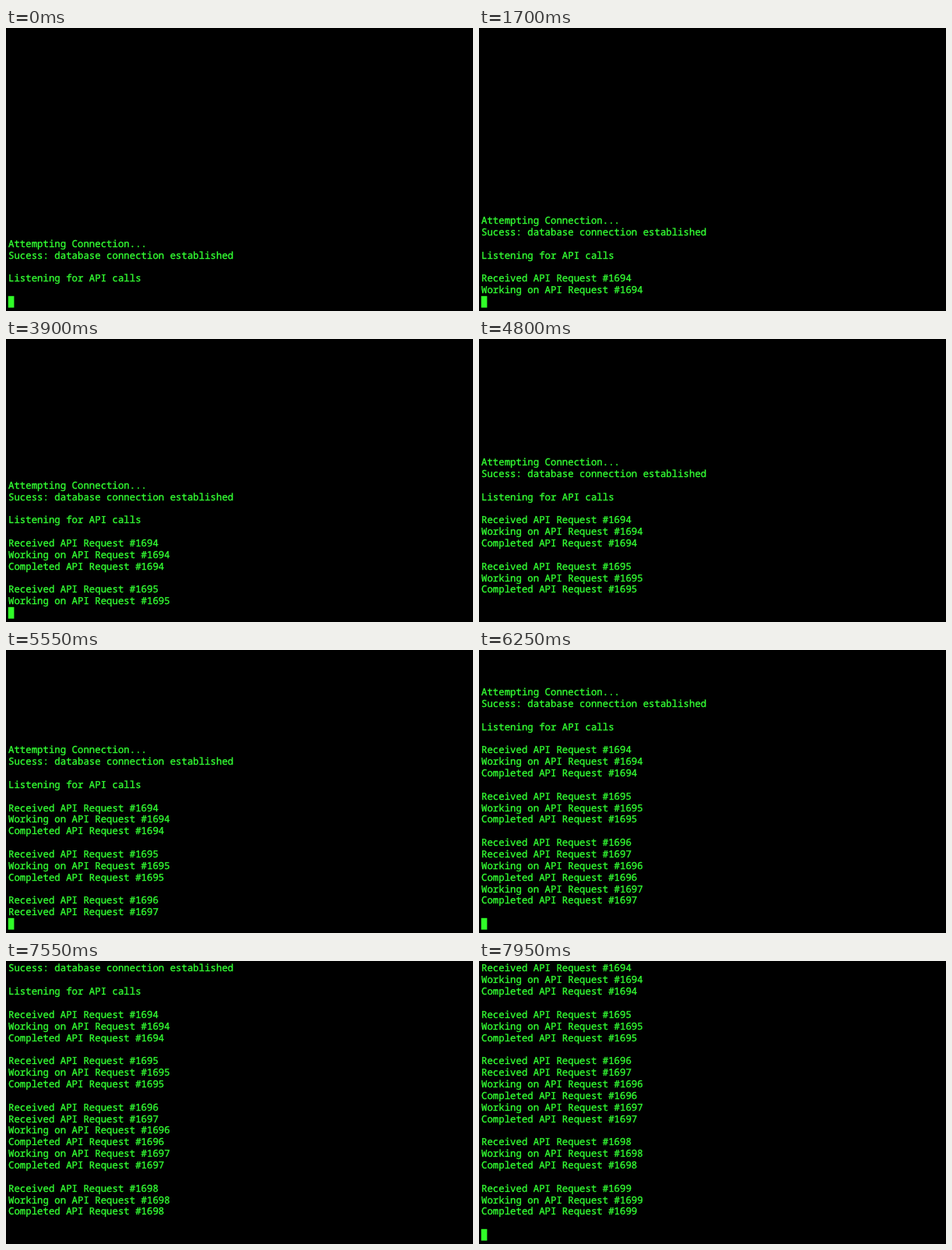
Write an HTML page that moves like this. It is 600 px wide and 363 px high and loops after 8000 ms.

```html
<!DOCTYPE html>
<html lang="en">
<head>
<meta charset="utf-8">
<title>Terminal log</title>
<style>
  html, body { margin: 0; width: 100%; height: 100%; overflow: hidden; background: #000; }
  svg { display: block; width: 600px; height: 363px; background: #000; }
  text {
    font: 12.37px "Noto Sans Mono", "DejaVu Sans Mono", monospace;
    fill: #33ff33;
    stroke: #33ff33;
    stroke-width: 0.35px;
    white-space: pre;
    text-rendering: geometricPrecision;
  }
  #cursor { fill: #30fe28; }
</style>
</head>
<body>
<svg viewBox="0 0 600 363">
  <g id="log"></g>
  <rect id="cursor" x="2.8" y="343.8" width="7.6" height="14.86"/>
</svg>
<script>
const LOOP = 8000;
const PITCH = 14.857;
const CURSOR_TOP = 343.8;
const BASELINE = 11.4;

const received = id => `Received API Request #${id}`;
const working = id => `Working on API Request #${id}`;
const completed = id => `Completed API Request #${id}`;

// Each entry: print time in ms, then the lines printed.
const prints = [
  [0, 'Attempting Connection...', 'Sucess: database connection established', '',
      'Listening for API calls', ''],
  [1600, received(1694), working(1694)],
  [1850, completed(1694), ''],
  [3900, received(1695), working(1695)],
  [4000, completed(1695), ''],
  [5550, received(1696), received(1697)],
  [5700, working(1696)],
  [5850, completed(1696)],
  [5950, working(1697)],
  [6150, completed(1697), ''],
  [6500, received(1698), working(1698)],
  [6600, completed(1698), ''],
  [7750, received(1699), working(1699)],
  [7850, completed(1699), '']
];

// Spans in which the cursor is hidden; printing brings it back early.
const hidden = [[550, 1050], [1550, 1600], [2550, 3050], [3550, 3900], [4550, 5050], [7550, 7750]];

const log = document.getElementById('log');
const cursor = document.getElementById('cursor');
const lines = prints.flatMap(([at, ...texts]) => texts.map(text => {
  const node = document.createElementNS('http://www.w3.org/2000/svg', 'text');
  node.textContent = text;
  node.setAttribute('x', 3);
  log.append(node);
  return { at, node };
}));

const show = (node, on) => node.setAttribute('visibility', on ? 'visible' : 'hidden');

function draw(t) {
  const count = lines.filter(line => line.at <= t).length;
  lines.forEach(({ node }, i) => {
    const top = CURSOR_TOP - (count - i) * PITCH;
    node.setAttribute('y', (top + BASELINE).toFixed(2));
    show(node, i < count && top >= 0);
  });
  show(cursor, !hidden.some(([from, to]) => t >= from && t < to));
}

const start = performance.now();
function tick() {
  draw((performance.now() - start) % LOOP);
  requestAnimationFrame(tick);
}
tick();
</script>
</body>
</html>
```
